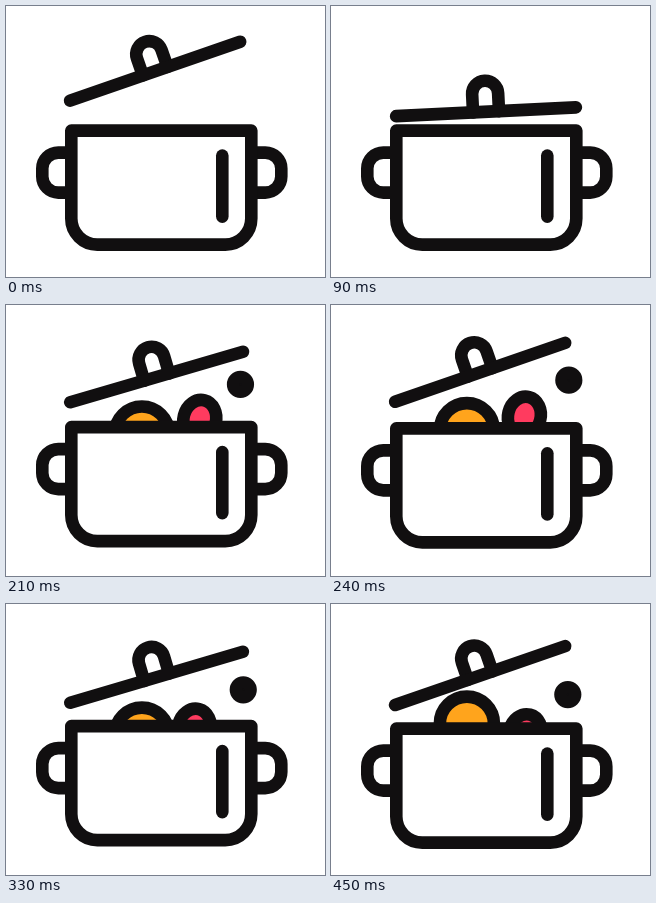
An HTML page with a canvas that plays this animation: 319x271 px, repeating every 600 ms.

```html
<!DOCTYPE html>
<html lang="en">
<head>
<meta charset="utf-8">
<title>Cooking pot</title>
<style>
  html, body { margin: 0; width: 100%; height: 100%; overflow: hidden; background: #fff; }
  canvas { display: block; }
</style>
</head>
<body>
<canvas id="stage" width="319" height="271"></canvas>
<script>
const ctx = document.getElementById('stage').getContext('2d');
const LOOP = 600, STEP = 30, LAST = 450;
const INK = '#110f10', ORANGE = '#ffa41c', RED = '#ff3b5f';
const { PI, sin, cos } = Math;

const progress = (t, from, to) => Math.min(1, Math.max(0, (t - from) / (to - from)));

function poseAt(t) {
  const sway = sin(PI * (t - 150) / 120);
  const hop = t > 150 && t < 390 ? sway ** 2 : 0;   // two small jumps of the pot
  const rebound = t > 270 ? hop : 0;
  const open = t < 240 ? (1 + cos(PI * t / 120)) / 2 : 1 - 0.14 * rebound;
  const depth = (1 - progress(t, 120, 270)) ** 3;   // food still inside the pot
  const settle = 1 - (1 - progress(t, 270, LAST)) ** 3;
  const potY = -2.5 * hop;

  return {
    potY,
    lid: { x: 65 - 1.2 * open, y: 112 - open * (18 - t / 70) + potY, tilt: -19.1 * open },
    carrot: { x: 135.6, y: 124 + 60 * depth + 9.5 * rebound - 5 * settle },
    tomato: { x: 191 + 3 * sway - 8 * depth, y: 110 + 57 * depth + 19 * settle },
    pea: { x: 238 - 60 * depth - 1.5 * settle, y: 74 + 75 * depth + 16 * settle }
  };
}

function shape(trace, fill) {
  ctx.beginPath();
  trace();
  if (fill) {
    ctx.fillStyle = fill;
    ctx.fill();
  }
  ctx.stroke();
}

function line(x1, y1, x2, y2) {
  shape(() => {
    ctx.moveTo(x1, y1);
    ctx.lineTo(x2, y2);
  });
}

function drawFood({ x, y }, rx, ry, tilt, fill) {
  shape(() => ctx.ellipse(x, y, rx, ry, tilt * PI / 180, 0, PI * 2), fill);
}

function drawLid({ x, y, tilt }) {
  ctx.save();
  ctx.translate(x, y);
  ctx.rotate(tilt * PI / 180);
  shape(() => {
    ctx.moveTo(77, 0);
    ctx.arc(90, -18, 13, PI, 0);
    ctx.lineTo(103, 0);
  }, '#fff');
  line(0, 0, 180, 0);
  ctx.restore();
}

function drawHandle(inner, outer) {
  shape(() => {
    ctx.moveTo(inner, 146);
    ctx.arcTo(outer, 146, outer, 166, 16);
    ctx.arcTo(outer, 186, inner, 186, 16);
    ctx.lineTo(inner, 186);
  });
}

function drawPot(y) {
  ctx.save();
  ctx.translate(0, y);
  drawHandle(65, 36);
  drawHandle(245, 275);
  shape(() => {
    ctx.moveTo(65, 124);
    ctx.lineTo(245, 124);
    ctx.arcTo(245, 238, 155, 238, 26);
    ctx.arcTo(65, 238, 65, 124, 26);
    ctx.closePath();
  }, '#fff');
  line(216, 149, 216, 210);
  ctx.restore();
}

function draw(now) {
  const t = Math.min(LAST, Math.floor((now % LOOP) / STEP) * STEP);
  const pose = poseAt(t);

  ctx.fillStyle = '#fff';
  ctx.fillRect(0, 0, 319, 271);
  ctx.strokeStyle = INK;
  ctx.lineWidth = 12.6;
  ctx.lineCap = ctx.lineJoin = 'round';

  ctx.save();
  ctx.translate(0.3, 0.6);
  if (t > 120) {
    drawFood(pose.carrot, 27, 27, 0, ORANGE);
    drawFood(pose.tomato, 16.3, 19.5, 14, RED);
    drawFood(pose.pea, 7.3, 7.3, 0, INK);
  }
  drawLid(pose.lid);
  drawPot(pose.potY);
  ctx.restore();
}

let start;
function tick(now) {
  start ??= now;
  draw(now - start);
  requestAnimationFrame(tick);
}
draw(0);
requestAnimationFrame(tick);
</script>
</body>
</html>
```
